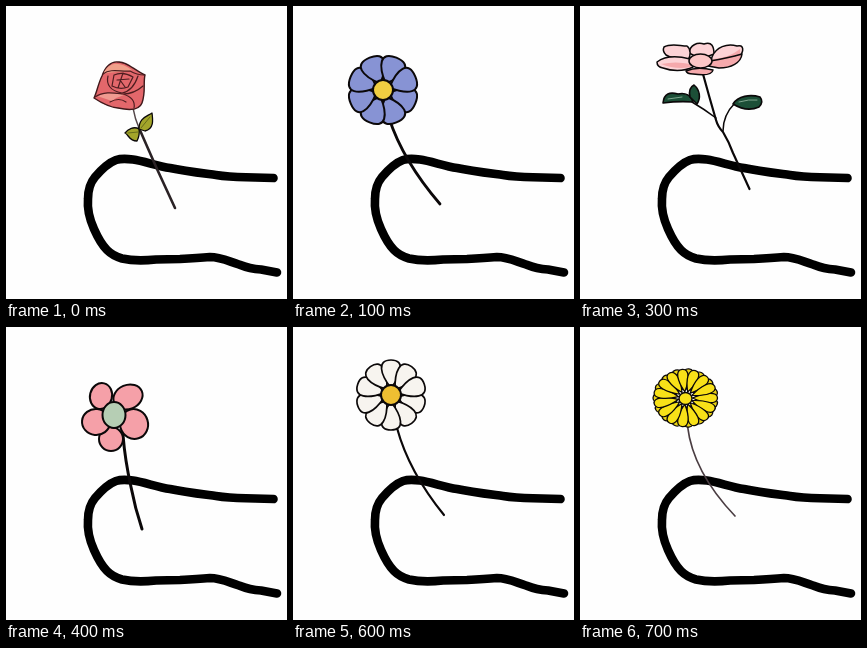
These frames come from a looping animation (281 px wide and 293 px high, 0.8 s). An HTML page with a canvas:

```html
<!DOCTYPE html>
<html lang="en">
<head>
<meta charset="utf-8">
<title>Flowers</title>
<style>
html, body { margin: 0; width: 100%; height: 100%; overflow: hidden; background: #fefefe; }
canvas { display: block; width: 281px; height: 293px; }
</style>
</head>
<body>
<canvas id="stage"></canvas>
<script>
const W = 281, H = 293, STEP = 100;
const INK = '#0b0809';
const canvas = document.getElementById('stage');
const ctx = canvas.getContext('2d');
const dpr = window.devicePixelRatio || 1;
canvas.width = W * dpr;
canvas.height = H * dpr;
ctx.scale(dpr, dpr);
ctx.lineCap = ctx.lineJoin = 'round';

function shape(d, fill, width = 2, ink = INK) {
  const path = new Path2D(d);
  if (fill) {
    ctx.fillStyle = fill;
    ctx.fill(path);
  }
  if (width) {
    ctx.strokeStyle = ink;
    ctx.lineWidth = width;
    ctx.stroke(path);
  }
}

const line = (d, width, ink) => shape(d, null, width, ink);

function oval(x, y, rx, ry, turn, fill, width = 2) {
  ctx.beginPath();
  ctx.ellipse(x, y, rx, ry, turn, 0, Math.PI * 2);
  ctx.fillStyle = fill;
  ctx.fill();
  if (width) {
    ctx.strokeStyle = INK;
    ctx.lineWidth = width;
    ctx.stroke();
  }
}

// Ring of teardrop petals around a centre
function petals(x, y, count, inner, outer, half, fill, width, squash = 1, start = 0) {
  for (let i = 0; i < count; i++) {
    ctx.save();
    ctx.translate(x, y);
    ctx.scale(1, squash);
    ctx.rotate(start + i * Math.PI * 2 / count);
    shape(`M${inner} 0C${outer * .6} ${-half} ${outer} ${-half * 1.3} ${outer} 0
      C${outer} ${half * 1.3} ${outer * .6} ${half} ${inner} 0Z`, fill, width);
    ctx.restore();
  }
}

function hand() {
  line(`M267.5 172L240 171.2Q222 171 210 169C195 167 178 165 164 162
    C151 160 138 155 127 153.5Q116 152 110 154C102 157 95 164 89 171
    C84 177 82 184 82 193C81 204 84 214 88 223C92 232 96 239 101 244
    Q107 250 116 252.5C127 255 140 254.5 150 253.5L174 253
    Q192 252 204 251C214 251 222 255 233 258.5Q244 263 255 263.5L271 266.5`, 8.6, '#000');
}

function rose() {
  line('M127 102Q129 113 133 122', 1.4, '#54484a');
  line('M133 122L151 163L169 202', 2.6, '#2a2225');
  shape('M133 123C128 120 122 123 119 127C123 129 123 135 131 135Q134 129 133 123Z', '#a3a52a', 1.3);
  shape('M133 123C133 112 140 111 146 107C147 114 148 123 139 125Z', '#a3a52a', 1.3);
  line('M122 127L132 126M144 111L135 122', .8, '#586019');
  shape(`M88 92C91 86 92 78 96 70C99 61 105 55 112 56C120 55 128 64 139 69
    C137 77 140 86 136 97C133 105 121 104 112 102C102 101 94 96 88 92Z`, '#e3676b', 1.4, '#3f191b');
  shape('M98 66C105 55 114 56 126 64C116 67 106 65 98 68Z', '#f0a08a', 0);
  shape('M91 90Q104 84 118 89Q111 91 106 95Z', '#f09a90', 0);
  line('M97 68C105 62 115 66 124 65Q131 69 138 69', 1.2, '#4e1d20');
  line('M102 70C100 78 104 85 116 87Q127 85 132 70', 1.2, '#4e1d20');
  line('M108 69Q117 65 127 71L122 81Q114 84 106 80ZM111 74L123 73M117 67L112 82M114 74L119 81', 1.2, '#4e1d20');
  line('M89 91C98 85 108 87 117 88Q128 88 137 80M117 88Q130 92 128 102M104 96Q113 91 120 96', 1.2, '#4e1d20');
}

function bluebloom() {
  line('M96 112Q110 155 147 198', 2.8);
  petals(90, 84, 8, 7, 35, 14, '#8793d4', 2, 1, Math.PI / 8);
  oval(90, 84, 10, 10, 0, '#f0ce42');
}

function tulip() {
  line('M107 153Q118 197 138 248', 3, '#1d191c');
  oval(103.5, 178, 10, 5.8, -.05, '#509f79', 2.6);
  oval(121, 169, 11, 6.2, -.85, '#509f79', 2.6);
  shape(`M72 118C71 108 80 101 90 101C97 101 103 104 106 109
    C113 111 117 119 117 128C116 141 110 152 101 153
    C91 155 81 147 76 137Q71 128 72 118Z`, '#b52021', 2.8);
  line('M72 116C80 109 93 116 94 130C95 140 98 147 102 152', 2.8);
  line('M77 113Q90 106 106 109C99 115 100 126 105 134Q109 141 110 146', 2.8);
  line('M91 121Q98 116 101 119', 2.2);
}

function pinkbloom() {
  const pale = '#fcd3d6', deep = '#f5a9ac', leaf = '#1c4f37';
  line('M123 68Q129 90 136 114Q138 121 143 126Q149 136 153 147L169.5 183', 2.2);
  line('M112 96Q124 103 136 112M143 125C143 112 148 104 155 97', 1.5);
  shape('M83 97C84 87 90 86 98 88C106 86 111 90 113 96Q98 95 83 97Z', leaf, 1.6);
  shape('M110 91Q108 82 114 79C120 84 121 92 117 98Z', leaf, 1.6);
  shape('M153 98C158 90 170 88 180 91Q184 96 179 101C170 105 161 103 153 98Z', leaf, 1.6);
  line('M88 93L102 91M159 96Q169 93 177 94', 1, '#7fa48d');
  shape('M109 47C110 39 117 36 124 38C132 35 134 41 134 48L121 53Z', pale, 1.5);
  shape('M84 41C91 37 100 40 107 40C111 43 111 50 108 54Q94 54 86 49Q82 45 84 41Z', pale, 1.5);
  shape('M132 51C136 41 147 37 157 40C164 38 164 45 160 50Q148 58 131 55Z', pale, 1.5);
  shape('M133 53Q149 52 160 43L160 50Q147 58 131 55Z', deep, 0);
  shape('M77 56C85 50 98 50 110 53L113 61C103 66 91 65 83 62Q77 61 77 56Z', pale, 1.5);
  shape('M81 58Q96 55 110 58L111 61Q96 64 81 58Z', deep, 0);
  shape('M130 55Q148 52 162 48C161 57 151 62 139 62L128 60Z', deep, 1.5);
  shape('M106 65Q117 60 133 64C132 70 120 69 113 68Q107 68 106 65Z', deep, 1.5);
  oval(120.5, 55, 11.5, 7, 0, '#fbc6c6', 1.5);
}

function fivepetal() {
  const pink = '#f5a0a8';
  line('M117 108Q119 133 125 160Q129 181 136 202', 3);
  oval(95, 69, 11, 13, .25, pink);
  oval(122, 70, 15, 12, -.4, pink);
  oval(128, 97, 14, 15, -.3, pink);
  oval(105, 112, 12, 12, 0, pink);
  oval(90, 95, 14, 13, .1, pink);
  oval(108, 88, 11.5, 13, 0, '#b6ceb4');
}

function rainbow() {
  line('M149 118C158 133 164 161 158 193', 3.5);
  oval(111, 74, 14, 14, .5, '#8e3f8a', 2.6);
  oval(139, 63, 12.5, 16, .2, '#e2535f', 2.6);
  oval(160, 82, 17, 12, -.35, '#f08a70', 2.6);
  oval(128, 116, 16, 15, 0, '#b9cdb6', 2.6);
  oval(149, 103, 14, 10, .45, '#4e9965', 2.6);
  oval(104, 101, 16, 13, -.5, '#3637d8', 2.6);
  oval(129, 89, 15, 15, 0, '#f4e018', 0);
}

function whitebloom() {
  line('M104 101Q116 145 151 188', 2.2);
  petals(98, 68, 10, 7, 35, 11, '#f7f4ef', 1.7, 1, Math.PI / 10);
  oval(98, 68, 10, 10, 0, '#eebf32');
}

function daisy() {
  line('M107.5 99Q113 145 155 189', 1.7, '#4a3d42');
  petals(105.5, 71, 15, 10, 32.5, 6, '#ead316', 1.3, .9, .21);
  petals(105.5, 71, 15, 7, 32, 6, '#f8e118', 1.3, .9);
  oval(105.5, 71.5, 6.5, 6, 0, '#f8e118', 1.4);
}

const flowers = [rose, bluebloom, tulip, pinkbloom, fivepetal, rainbow, whitebloom, daisy];

function draw(now) {
  ctx.fillStyle = '#fefefe';
  ctx.fillRect(0, 0, W, H);
  hand();
  flowers[Math.floor(now / STEP) % flowers.length]();
}

let first;
function tick(now) {
  first ??= now;
  draw(Math.max(0, now - first));
  requestAnimationFrame(tick);
}
draw(0);
requestAnimationFrame(tick);
</script>
</body>
</html>
```
